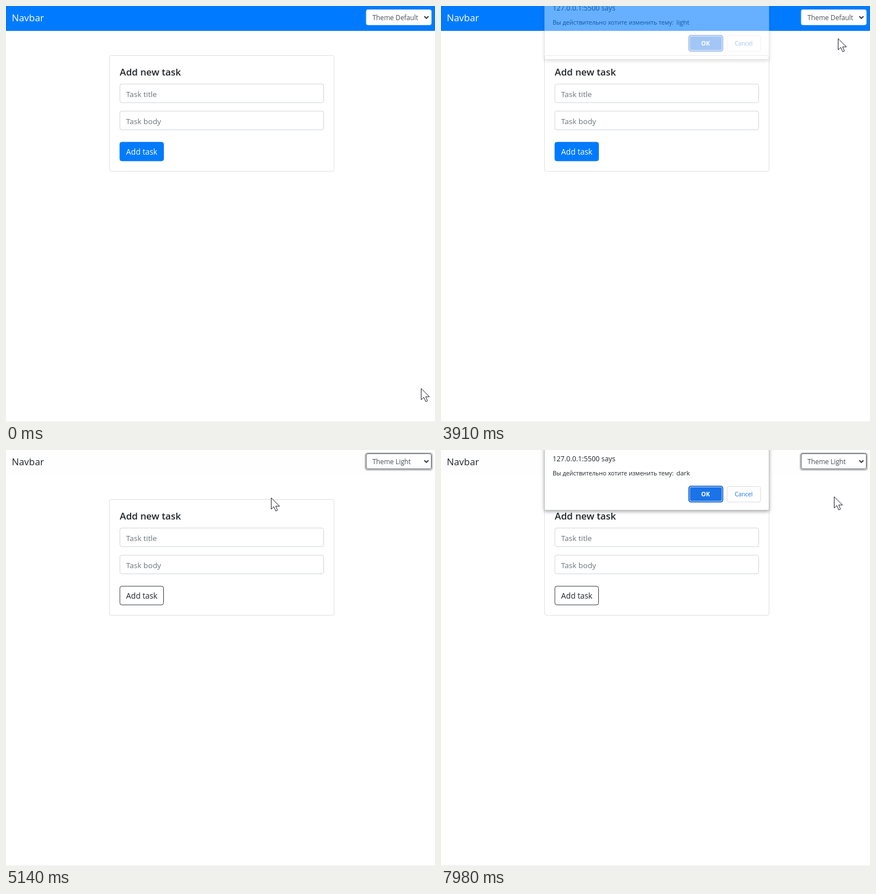
Recreate the animation shown at these times as an HTML page. Size 761 px wide and 736 px high, loop 8 s.

```html
<!DOCTYPE html>
<html lang="en">
<head>
<meta charset="utf-8">
<title>Theme switcher</title>
<style>
  html, body { margin: 0; width: 100%; height: 100%; overflow: hidden; background: #fff; }
  svg { display: block; font-family: "Open Sans", "Noto Sans", sans-serif; }
  text { white-space: pre; fill: #212529; }
  .field { fill: #fff; stroke: #ced4da; }
  .hint { fill: #6c757d; font-size: 13.45px; }
  .opt { fill: #495057; font-size: 11.8px; }
  .soft { filter: drop-shadow(0 2px 3px rgba(0, 0, 0, .35)); }
</style>
</head>
<body>
<svg width="761" height="736" viewBox="0 0 761 736">
  <rect id="nav" width="761" height="44"/>
  <text id="brand" x="10.2" y="26.5" font-size="16.9">Navbar</text>
  <rect y="735" width="761" height="1" fill="#eee"/>

  <rect x="183.5" y="87.5" width="398.5" height="205" rx="3.5" fill="#fff" stroke="#dfdfdf"/>
  <text x="201.8" y="123" font-size="16.8" font-weight="600">Add new task</text>
  <rect class="field" x="202" y="138" width="361.5" height="33" rx="3.5"/>
  <text class="hint" x="213" y="160.5">Task title</text>
  <rect class="field" x="202" y="186" width="361.5" height="33" rx="3.5"/>
  <text class="hint" x="213" y="208.5">Task body</text>
  <rect id="btn" x="202" y="241" width="77.5" height="33" rx="3.5"/>
  <text id="btnText" x="213" y="262.8" font-size="13.8">Add task</text>

  <rect id="ring" x="637.5" y="5.5" width="118.5" height="30" rx="4" fill="none" stroke="#343a40" stroke-opacity=".28" stroke-width="2.6"/>
  <rect id="select" x="639" y="6.5" width="115.5" height="27" rx="3" fill="#fff"/>
  <text id="value" class="opt" x="650" y="24.6"></text>
  <path d="M742 18.2l3.7 3.7 3.7-3.7" fill="none" stroke="#343a40" stroke-width="2"/>

  <g id="popup">
    <rect id="sheet" class="soft" x="639" y="34.5" width="115.5" height="54" fill="#fff"/>
    <g id="items">
      <rect id="hover" x="639.5" width="114.5" height="17.6" fill="#1e90ff"/>
      <text class="opt" x="650" y="48">Theme Default</text>
      <text class="opt" x="650" y="65.8">Theme Light</text>
      <text class="opt" x="650" y="83.4">Theme Dark</text>
    </g>
  </g>

  <g id="dialog">
    <rect class="soft" x="183.5" y="-20" width="398.5" height="126.5" rx="2" fill="#fff" stroke="#b4b6b8" stroke-width=".8"/>
    <text x="198" y="20.3" font-size="12.3">127.0.0.1:5500 says</text>
    <text x="198" y="45.3" font-size="10.6">Вы действительно хотите изменить тему:</text>
    <text id="theme" x="417.5" y="45.3" font-size="11.4"></text>
    <rect x="439.8" y="64.3" width="59.9" height="27.4" rx="3.5" fill="#fff" stroke="#1a66cc" stroke-width="2"/>
    <rect x="441.5" y="66" width="56.5" height="24" rx="2" fill="#1a73e8"/>
    <text x="461.6" y="82" font-size="10.7" font-weight="700" style="fill:#fff">OK</text>
    <rect x="507.5" y="64.5" width="59.5" height="27.5" rx="3.5" fill="#fff" stroke="#dadce0"/>
    <text x="521" y="82" font-size="10.3" font-weight="500" style="fill:#1a73e8">Cancel</text>
  </g>

  <g id="pointer">
    <circle id="click" r="16" fill="#ff0" fill-opacity=".6"/>
    <path d="M.5.8V20.6L5.2 16.3 8.6 24 11.7 22.6 8.4 15.3H15.2Z" fill="#fff" stroke="#1c1c2a"/>
  </g>
</svg>
<script>
const LOOP = 8000;
const el = id => document.getElementById(id);
const set = (id, attrs) => { for (const k in attrs) el(id).setAttribute(k, attrs[k]); };
const show = (id, on) => { el(id).style.display = on ? "" : "none"; };
const within = (t, a, b) => t >= a && t < b;

// start, end, steps, then start / control / end point of the path
const moves = [
  [70, 70, 1, 745, 415, 745, 415, 745, 415],
  [140, 140, 1, 800, 200, 800, 200, 800, 200],
  [540, 890, 6, 726, 161, 687, 40, 698, 28],
  [1090, 1090, 1, 698, 27, 698, 27, 698, 27],
  [2760, 3170, 7, 698, 27, 703, 42, 704, 57],
  [4100, 4510, 7, 704, 57, 590, 143, 470, 84],
  [5400, 6170, 12, 470, 84, 600, 121, 716, 20],
  [6220, 6220, 1, 717, 19, 717, 19, 717, 19],
  [6920, 7320, 7, 717, 19, 712, 50, 697, 81.5]
];
const clicks = [2030, 3770, 4580, 6640, 7650];
const popups = [
  { open: 2100, items: 2160, close: 3830, row: 0 },
  { open: 6640, items: 6710, close: 7720, row: 1 }
];
// time, opacity, vertical offset
const dialogs = [
  { name: "light", steps: [[3900, .4, -12], [3970, .85, -4], [4040, 1, -1], [4100, 1, 0], [4710, .5, -3], [4780, 0, 0]] },
  { name: "dark", steps: [[7780, .4, -12], [7850, .85, -4], [7910, 1, -1], [7980, 1, 0]] }
];
const LIGHT = 4780;

const bezier = (a, b, c, p) => a * (1 - p) ** 2 + 2 * b * p * (1 - p) + c * p * p;

function pointerAt(t) {
  const m = moves.filter(v => v[0] <= t).pop();
  if (!m) return [736, 676];
  const [t0, t1, n, x0, y0, cx, cy, x1, y1] = m;
  if (n === 1) return [x1, y1];
  const k = Math.min(n - 1, Math.floor((t - t0) / (t1 - t0) * (n - 1) + .02));
  const first = t0 === 540 ? 0 : 1;
  const u = (k + first) / (n - 1 + first);
  const p = u * u * (3 - 2 * u);
  return [bezier(x0, cx, x1, p), bezier(y0, cy, y1, p)];
}

function mix(a, b, p) {
  return `rgb(${a.map((v, i) => Math.round(v + (b[i] - v) * p))})`;
}

function draw(t) {
  const light = t >= LIGHT;
  const fade = light ? Math.min(1, Math.floor((t - LIGHT) / 68 + 1) / 3) : 0;
  const [x, y] = pointerAt(t);

  set("nav", { fill: light ? "#fefefe" : "#007bff" });
  el("brand").style.fill = light ? "#212529" : "#fff";
  set("btn", {
    fill: mix([0, 123, 255], [255, 255, 255], fade),
    stroke: mix([4, 112, 229], [52, 58, 64], fade)
  });
  el("btnText").style.fill = mix([255, 255, 255], [33, 37, 41], fade);
  set("select", { stroke: mix([206, 224, 240], [72, 78, 84], fade) });
  el("value").textContent = light ? "Theme Light" : "Theme Default";

  const pop = popups.find(p => within(t, p.open, p.close));
  show("ring", light && !pop);
  set("ring", { opacity: fade });
  show("popup", pop);
  if (pop) {
    const ready = t >= pop.items;
    const row = y > 34.5 ? Math.min(2, Math.floor((y - 34.5) / 17.8)) : pop.row;
    show("items", ready);
    set("sheet", { stroke: ready ? "#6c6c6c" : "none", y: ready ? 34.5 : 36.5, height: ready ? 54 : 52 });
    set("hover", { y: 35 + row * 17.6 });
    document.querySelectorAll("#items text").forEach((e, i) => { e.style.fill = i === row ? "#fff" : ""; });
  }

  const dlg = dialogs.find(d => t >= d.steps[0][0] && (d.name === "dark" || t < LIGHT));
  show("dialog", dlg);
  if (dlg) {
    const [, opacity, dy] = dlg.steps.filter(s => s[0] <= t).pop();
    set("dialog", { opacity, transform: `translate(0 ${dy})` });
    el("theme").textContent = dlg.name;
  }

  show("click", clicks.some(c => within(t, c, c + 130)));
  set("pointer", { transform: `translate(${Math.round(x)} ${Math.round(y)})` });
}

const start = performance.now();
function tick() {
  draw((performance.now() - start) % LOOP);
  requestAnimationFrame(tick);
}
draw(0);
requestAnimationFrame(tick);
</script>
</body>
</html>
```
